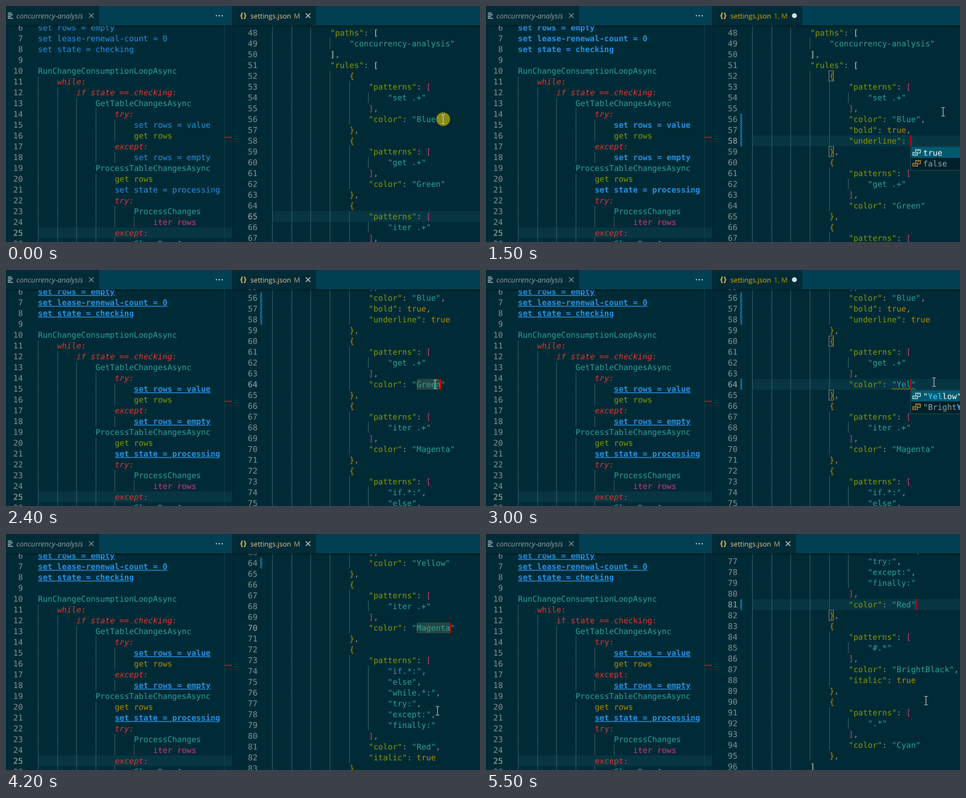
An HTML page that plays this animation: 830 px wide and 415 px high, repeating every 5.6 s.

```html
<!DOCTYPE html>
<html lang="en">
<head>
<meta charset="utf-8">
<title>Highlight rules</title>
<style>
  html, body { margin: 0; width: 100%; height: 100%; overflow: hidden; background: #002b36; }
  svg { display: block; width: 830px; height: 415px; }
  text { white-space: pre; text-rendering: geometricPrecision; }
  .code { font-family: "DejaVu Sans Mono", monospace; font-size: 13.95px; }
  .ui { font-family: "Open Sans", sans-serif; font-size: 12.2px; }
</style>
</head>
<body>
<svg id="stage" viewBox="0 0 830 415"></svg>
<script>
const LOOP = 5600, CW = 8.4, LH = 19, INDENT = 4 * CW;
const LEFT = 56, RIGHT = 466.2, FIRST = 47, BAR = 34;
const C = {
  bg: '#002b36', bar: '#004052', tab: '#002b37', line: '#073642', guide: '#3c5d64',
  num: '#84908f', numOn: '#a5abab', cyan: '#2aa198', blue: '#2490e4', green: '#859900',
  red: '#e5322f', magenta: '#d33682', yellow: '#b58900', plain: '#839496', light: '#cdcdcd',
  caret: '#d30102'
};

const leftCode = [
  [0, 'set rows = empty'], [0, 'set lease-renewal-count = 0'], [0, 'set state = checking'], [0, ''],
  [0, 'RunChangeConsumptionLoopAsync'], [1, 'while:'], [2, 'if state == checking:'],
  [3, 'GetTableChangesAsync'], [4, 'try:'], [5, 'set rows = value'], [5, 'get rows'],
  [4, 'except:'], [5, 'set rows = empty'], [3, 'ProcessTableChangesAsync'], [4, 'get rows'],
  [4, 'set state = processing'], [4, 'try:'], [5, 'ProcessChanges'], [6, 'iter rows'],
  [4, 'except:'], [5, 'ClearRowsAsync']
];

const BLUE = '"color": "Blue"', BOLD = '"bold": true', UNDER = '"underline": true';
const RED = '"color": "Red"', ITALIC = '"italic": true';
const color = name => ['"color": "' + name + '"'];
const blue = (...more) => [BLUE + ',', ...more];
const bools = match => ({ list: ['true', 'false'], match });
const yellows = match => ({ list: ['"Yellow"', '"BrightYellow"'], match });

// Each step patches the state before it.
const steps = [
  [0, { scroll: 0, row: 65, back: null, box: false, sel: null, word: null, pop: null, wave: null,
        mouse: [766, 199], click: true, tab: 'M', dirty: false, marks: [],
        blue: [BLUE], get: color('Green'), red: [RED + ',', ITALIC],
        bold: false, under: false, getHue: C.green, italic: true }],
  [100, { row: 56, back: 0, box: true }],
  [200, { blue: blue(), dirty: true, click: false, mouse: [783, 192], marks: [[56, 56]] }],
  [300, { blue: blue(''), row: 57, mouse: [801, 186], marks: [[56, 57]] }],
  [400, { blue: blue('"b"'), back: 1, tab: '1, M', pop: { list: ['"bold"', '"underline"'], match: '"b' } }],
  [500, { blue: blue('"bold": '), back: 0, pop: bools('') }],
  [600, { blue: blue('"bold": t'), pop: bools('t') }],
  [700, { blue: blue(BOLD), tab: 'M', pop: null, word: [8, 4] }],
  [900, { dirty: false, bold: true }],
  [1000, { blue: blue(BOLD + ','), dirty: true, word: null }],
  [1100, { blue: blue(BOLD + ',', ''), row: 58, marks: [[56, 58]] }],
  [1200, { blue: blue(BOLD + ',', '""'), back: 1 }],
  [1400, { blue: blue(BOLD + ',', '"un"'), tab: '1, M', pop: { list: ['"underline"', '"color"'], match: '"un' } }],
  [1500, { blue: blue(BOLD + ',', '"underline": '), back: 0, pop: bools('') }],
  [1600, { blue: blue(BOLD + ',', '"underline": t'), pop: bools('t') }],
  [1700, { blue: blue(BOLD + ',', UNDER), tab: 'M', pop: null, word: [13, 4] }],
  [1900, { dirty: false, under: true }],
  [2000, { scroll: 50 }],
  [2100, { scroll: 100 }],
  [2200, { scroll: 150, mouse: [796, 190] }],
  [2300, { mouse: [752, 201] }],
  [2400, { row: 64, back: 1, word: null, box: false, sel: [10, 5] }],
  [2500, { get: color(''), sel: null, box: true, dirty: true, marks: [[56, 58], [64, 64]] }],
  [2600, { tab: '1, M', wave: 9 }],
  [2800, { get: color('Y'), mouse: [785, 197],
           pop: { list: ['"Yellow"', '"BrightYellow"', '"Cyan"', '"BrightCyan"'], match: 'Y' } }],
  [2900, { get: color('Ye'), pop: yellows('Ye') }],
  [3000, { get: color('Yel'), pop: yellows('Yel') }],
  [3100, { get: color('Yell'), pop: yellows('Yell') }],
  [3200, { get: color('Yello'), pop: yellows('Yello') }],
  [3400, { get: color('Yellow'), back: 0, pop: null, wave: null, tab: 'M' }],
  [3600, { dirty: false, getHue: C.yellow }],
  [3700, { scroll: 200 }],
  [3800, { scroll: 250 }],
  [3900, { scroll: 300, mouse: [775, 180] }],
  [4000, { mouse: [757, 165] }],
  [4100, { row: 70, back: 1, box: false, sel: [10, 7] }],
  [4200, { mouse: [756, 311] }],
  [4300, { scroll: 350 }],
  [4400, { scroll: 400, mouse: [771, 293] }],
  [4500, { row: 82, back: 0, sel: null, box: true }],
  [4700, { back: 14, sel: [0, 14] }],
  [4800, { red: [RED + ',', ''], back: 0, sel: null, dirty: true }],
  [4900, { red: [RED + ','], row: 81 }],
  [5000, { red: [RED], marks: [[56, 58], [64, 64], [81, 81]] }],
  [5200, { dirty: false, italic: false }],
  [5300, { scroll: 450 }],
  [5400, { scroll: 500 }],
  [5500, { scroll: 550 }]
];
const states = [];
steps.forEach(([, patch], i) => states.push({ ...states[i - 1], ...patch }));

const rect = (x, y, w, h, fill, more = '') =>
  `<rect x="${x}" y="${y}" width="${w}" height="${h}" fill="${fill}" ${more}/>`;
const path = (d, stroke, width = 1) =>
  `<path d="${d}" fill="none" stroke="${stroke}" stroke-width="${width}"/>`;
const text = (x, y, str, fill, more = 'class="code"') =>
  `<text x="${x}" y="${y}" fill="${fill}" ${more}>${str}</text>`;
const number = (x, y, n, on) =>
  text(x, y + 5, n, on ? C.numOn : C.num, 'class="code" text-anchor="end"');
const guides = (x, y, level) => Array.from({ length: level }, (_, i) =>
  rect(Math.round(x + i * INDENT), y - 9.5, 1, LH, C.guide)).join('');
const cross = (x, stroke) => path(`M${x - 4} 13l8 8m0 -8l-8 8`, stroke, 1.2);

function rule(patterns, tail) {
  const last = patterns.length - 1;
  return [[4, '{'], [5, '"patterns": ['],
    ...patterns.map((p, i) => [6, `"${p}"${i < last ? ',' : ''}`]),
    [5, '],'], ...tail.map(t => [5, t]), [4, '},']];
}

function settings(s) {
  return [[2, '{'], [3, '"paths": ['], [4, '"concurrency-analysis"'], [3, '],'], [3, '"rules": ['],
    ...rule(['set .+'], s.blue),
    ...rule(['get .+'], s.get),
    ...rule(['iter .+'], color('Magenta')),
    ...rule(['if.*:', 'else', 'while.*:', 'try:', 'except:', 'finally:'], s.red),
    ...rule(['#.*'], ['"color": "BrightBlack",', ITALIC]),
    ...rule(['.*'], color('Cyan')),
    [3, ']'], [2, '}']];
}

function json(x, y, level, str) {
  const bracket = [C.magenta, C.light, C.yellow, C.magenta][level - 2];
  let out = '';
  for (const m of str.matchAll(/"[^"]*"?|[a-z]+|[{}\[\]]|[,:]/g)) {
    const tok = m[0], isKey = str[m.index + tok.length] === ':';
    const fill = tok[0] === '"' ? (isKey ? C.green : C.cyan)
      : /[a-z]/.test(tok) ? C.yellow : /[,:]/.test(tok) ? C.plain : bracket;
    out += text(x + m.index * CW, y + 5, tok, fill);
  }
  return out;
}

function leftStyle(str, s) {
  if (/^set /.test(str))
    return [C.blue, (s.bold ? 'font-weight="700" ' : '') + (s.under ? 'text-decoration="underline"' : '')];
  if (/^get /.test(str)) return [s.getHue, ''];
  if (/^iter /.test(str)) return [C.magenta, ''];
  if (/:$/.test(str)) return [C.red, s.italic ? 'font-style="italic"' : ''];
  return [C.cyan, ''];
}

function leftPane(s) {
  let out = rect(LEFT, 389.5, 340, LH, C.line);
  leftCode.forEach(([level, str], i) => {
    const y = 38 + i * LH, [fill, style] = leftStyle(str, s);
    out += number(29.6, y, i + 6, i === 19) + guides(LEFT, y, level)
      + text(LEFT + level * INDENT, y + 5, str, fill, 'class="code" ' + style);
  });
  return out + rect(382, BAR, 1, 415 - BAR, '#12404a') + rect(383, 230, 13, 2, '#a8182a');
}

function popup(x, y, { list, match }) {
  let out = rect(x, y, 260, list.length * LH + 4, '#00212b', 'stroke="#17505a"');
  list.forEach((item, i) => {
    const cy = y + 10.5 + i * LH, ix = x + 4;
    if (!i) out += rect(x + 1, cy - 9.5, 258, LH, '#005a6f');
    out += path(`M${ix + 5} ${cy - 1}v-4h8v6h-4M${ix + 7} ${cy - 3}h4M${ix} ${cy}h8v5h-8zM${ix + 2} ${cy + 2.5}h4`,
      i ? '#ee9d28' : '#e4eef2', 1.2);
    const at = match ? item.indexOf(match) : -1;
    const label = at < 0 ? item : item.slice(0, at)
      + `<tspan font-weight="700" fill="#2ab8f0">${match}</tspan>` + item.slice(at + match.length);
    out += text(x + 22, cy + 5, label, i ? '#93a1a1' : '#ffffff');
  });
  return out;
}

function rightPane(s) {
  const doc = settings(s), textX = level => RIGHT + 0.8 + level * INDENT;
  const yOf = n => n * LH - 865 - s.scroll;
  const y = yOf(s.row), colX = c => textX(5) + c * CW;
  let out = '', over = '';
  if (s.sel) out += rect(colX(s.sel[0]), y - 9.5, s.sel[1] * CW, LH, '#274642', 'rx="3"');
  else out += rect(RIGHT, y - 9.5, 364, LH, C.line);
  if (s.word) out += rect(colX(s.word[0]), y - 9.5, s.word[1] * CW, LH, '#404b4c');
  if (s.box) {
    const at = s.row - FIRST, isBrace = ([level]) => level === 4;
    const open = doc.slice(0, at).findLastIndex(isBrace);
    const close = at + doc.slice(at).findIndex(isBrace);
    for (const i of [open, close])
      over += rect(Math.round(textX(4)) - 0.5, yOf(i + FIRST) - 9, 8, 18, 'none', 'stroke="#888"');
  }
  for (const [a, b] of s.marks) out += rect(445, yOf(a) - 9.5, 3.5, (b - a + 1) * LH, 'url(#hatch)');
  doc.forEach(([level, str], i) => {
    const n = i + FIRST, cy = yOf(n);
    if (cy < 20 || cy > 430) return;
    out += number(440.4, cy, n, n === s.row) + guides(RIGHT, cy, level) + json(textX(level), cy, level, str);
  });
  out += over;
  if (s.back !== null) {
    const len = doc[s.row - FIRST][1].length, cx = Math.round(colX(len - s.back));
    if (s.wave) {
      const waves = Math.ceil((len - s.wave) * CW / 6);
      out += path(`M${colX(s.wave)} ${y + 8}` + 'q1.5 -3 3 0t3 0'.repeat(waves), '#cca700');
    }
    out += rect(cx - 1, y - 9.5, 2, LH, C.caret);
    if (s.pop) out += popup(cx - 0.5, y + 10, s.pop);
  }
  return out;
}

function tabs(s) {
  const ok = s.tab === 'M', closeX = ok ? 529 : 540, tint = ok ? '#e8c896' : '#d9b200';
  return rect(0, BAR, 830, 4, 'url(#shade)') + rect(0, 0, 830, BAR, C.bar)
    + rect(0, 0, 163, BAR, C.tab) + rect(397, 0, closeX + 14 - 397, BAR, C.tab)
    + path('M3 12.5h7M3 15.5h9M3 18.5h6M3 21.5h9', '#b8c4c6', 1.3)
    + text(18, 21.5, 'concurrency-analysis', '#93a1a1', 'class="ui" style="font-size:12.7px" font-style="italic"')
    + cross(149.5, '#7f9296')
    + [368.5, 373.5, 378.5].map(x => `<circle cx="${x}" cy="17" r="1.2" fill="#c5cccd"/>`).join('')
    + text(410, 21, '{}', '#e3c14c', 'class="ui" style="font-size:13px" font-weight="700" letter-spacing="1"')
    + text(428, 21.5, 'settings.json', tint, 'class="ui"')
    + text(504, 21.5, s.tab, tint, 'class="ui" opacity=".8"')
    + (s.dirty ? `<circle cx="${closeX}" cy="17" r="4.3" fill="#d9dddd"/>` : cross(closeX, '#d9dddd'))
    + rect(396, 0, 1, 415, '#00212b');
}

function pointer({ mouse: [mx, y], click }) {
  const x = mx - 0.5;
  return (click ? `<circle cx="${x}" cy="${y}" r="12" fill="#a39b0c" opacity=".85"/>` : '')
    + path(`M${x - 3} ${y - 7.5}h2.5l.5 .5l.5 -.5h2.5M${x} ${y - 7}v14M${x - 3} ${y + 7.5}h2.5l.5 -.5l.5 .5h2.5`, '#d0d6d6');
}

const defs = `<defs>
  <pattern id="hatch" width="4" height="4" patternUnits="userSpaceOnUse">
    <path d="M-1 1l2 -2M0 4l4 -4M3 5l2 -2" stroke="#2b9ad0" stroke-width="1.4"/></pattern>
  <linearGradient id="shade" x2="0" y2="1"><stop stop-opacity=".35"/><stop offset="1" stop-opacity="0"/></linearGradient>
</defs>`;
const stage = document.getElementById('stage');
let shown = -1;

function draw(now) {
  const t = now % LOOP;
  const i = steps.findLastIndex(([at]) => at <= t);
  if (i !== shown) {
    const s = states[shown = i];
    stage.innerHTML = defs + rect(0, 0, 830, 415, C.bg) + leftPane(s) + rightPane(s) + tabs(s) + pointer(s);
  }
}

const start = performance.now();
function tick() {
  draw(performance.now() - start);
  requestAnimationFrame(tick);
}
tick();
</script>
</body>
</html>
```
